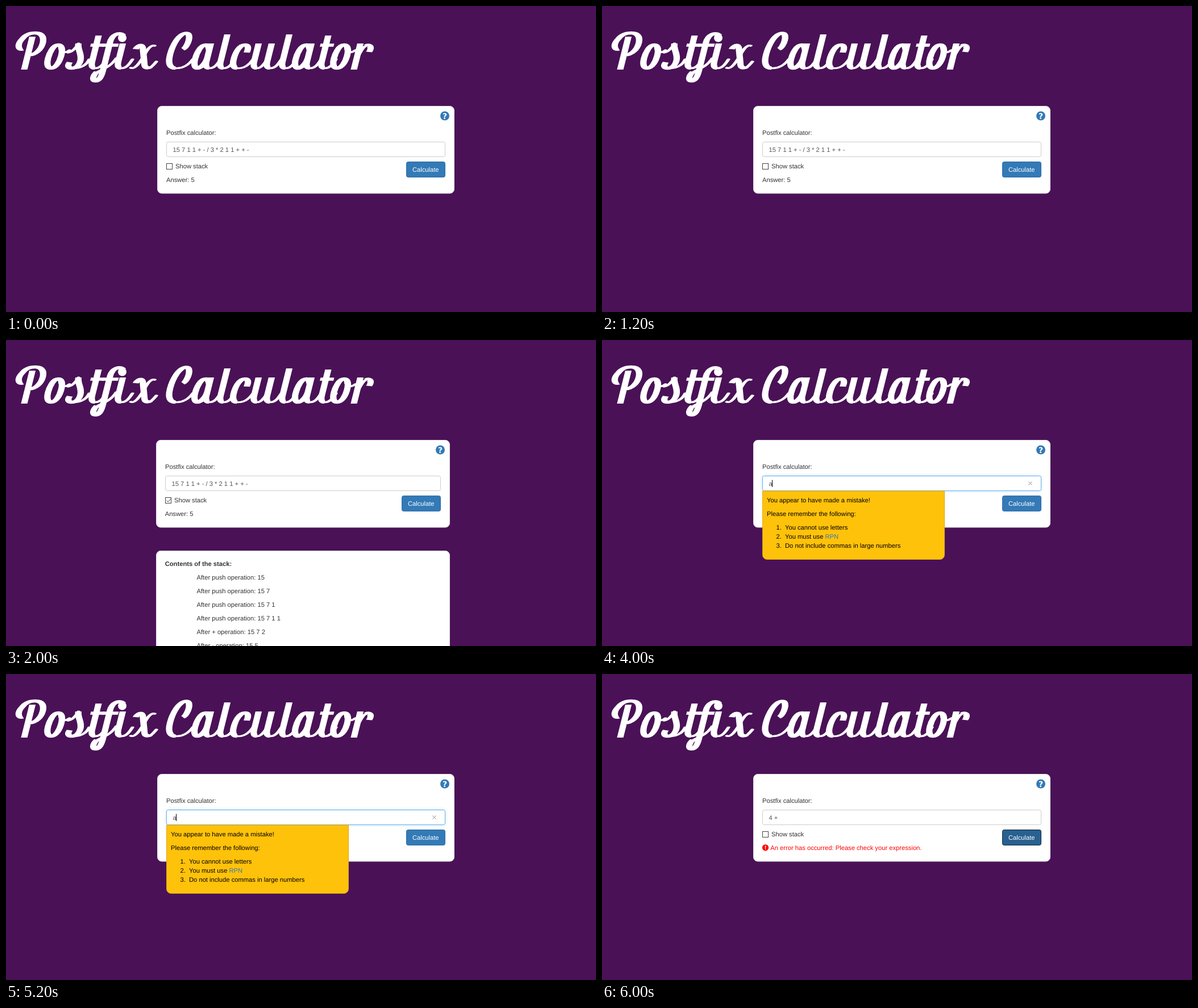
Animation, 1038 px wide and 539 px high, one loop 8 s. Source, as an HTML page:

```html
<!DOCTYPE html>
<html lang="en">
<head>
<meta charset="utf-8">
<title>Postfix Calculator</title>
<style>
html, body { margin: 0; width: 100%; height: 100%; overflow: hidden; background: #4a1157; }
svg { display: block; }
text { font: 11.2px "Liberation Sans", Arial, sans-serif; fill: #333; text-rendering: geometricPrecision; white-space: pre; }
.bold { font-weight: bold; }
.field { fill: #555; }
.white { fill: #fff; }
.error { fill: #f00; }
.black { fill: #000; }
.link { fill: #337ab7; }
.mid { text-anchor: middle; }
.mark { font: bold 14px "DejaVu Sans", sans-serif; }
.small { font-size: 9px; }
#title { fill: none; stroke: #fff; }
</style>
</head>
<body>
<svg width="1038" height="539" viewBox="0 0 1038 539">
  <defs><filter id="glow" x="-5%" y="-60%" width="110%" height="220%"><feGaussianBlur stdDeviation="2"/></filter></defs>
  <g id="title" role="img" aria-label="Postfix Calculator"></g>
  <g id="scenes"></g>
</svg>
<script>
const STEP = 2000;

// Script lettering: upright skeletons, slanted and drawn with a flat pen.
// Each glyph holds its heavy strokes and its light strokes.
const foot = x => `V-14C${x} -6 ${x + 1.5} -2.7 ${x + 4} -2.7`;
const exit = x => `M${x + 3} -2.5C${x + 8} -1 ${x + 10} -8 ${x + 12} -18`;
const stem = (x, top) => `M${x} ${top}${foot(x)}`;
const glyphs = {
  P: ['M7.5 0V-58M2 -36C-3 -34 -4 -46 -1 -54C1 -62 5 -64.5 9 -64.5C16 -64.5 18 -55 18 -47C18 -35 14 -26 9 -26', ''],
  o: ['M8.5 -43.5C5 -43.5 3 -30 3 -20C3 -8 5 -2.5 8 -2.5C12 -2.5 14 -14 14 -25C14 -37 12 -43.5 8.5 -43.5Z', 'M11 -40C12 -30 17 -28 20 -34'],
  s: ['M7 -46C7 -36 12.5 -28 12.5 -16C12.5 -7 10 -2.5 6.5 -2.5C3 -2.5 2 -8 3.5 -13', 'M0 -30C3 -31 6 -38 7 -46M8 -2.5C15 -2 19 -9 20 -18'],
  t: [stem(0, -60) + 'M-5 -43H7', exit(0)],
  f: ['M10 -60C6 -67 0 -62 0 -48V2C0 14 -1.5 20 -4 20C-7.5 20 -8 10 -5 4M-6 -43H8', 'M-5 5C-2 0 6 -4 9 -20'],
  i: [stem(0, -46), exit(0)],
  x: ['M0 -36C2 -45 5 -45 6.5 -36L11 -10C12 -2 15 -2 17 -5', 'M0 -3C4 -1 6 -10 8.5 -22C10 -34 12 -44 16 -42M15 -3C17 -2 19 -7 21 -14'],
  C: ['M13 -36C17 -39 18 -64 12.5 -64C6 -64 3 -42 3 -26C3 -10 6 -2.5 11 -2.5', 'M10 -2.5C17 -1 22 -9 24 -18'],
  a: [stem(13.5, -46) + 'M13.5 -34C12 -41 11 -43.5 9 -43.5C5 -43.5 3 -30 3 -18C3 -8 5 -2.5 7 -2.5C10 -2.5 13.5 -12 13.5 -22', exit(13.5)],
  l: [stem(0, -62), exit(0)],
  c: ['M13 -30C14 -40 12 -43.5 9.5 -43.5C5 -43.5 3 -30 3 -18C3 -8 5 -2.5 8 -2.5', 'M7 -2.5C14 -1 18 -9 20 -18'],
  u: [stem(0, -46) + stem(11.5, -46), 'M3 -2.5C7 -1 10 -10 11.5 -22' + exit(11.5)],
  r: ['M0 -46V0M5.5 -42C8 -45 11.5 -40 9.5 -31', 'M0 -18C2 -32 3 -41 6 -42']
};
const letters = [...'PostfixCalculator'];
const starts = [17, 63, 102, 148, 171, 194, 219, 276, 322, 374, 390, 433, 483, 499, 552, 566, 612];

document.getElementById('title').innerHTML = letters.map((ch, i) => {
  const [heavy, light] = glyphs[ch];
  return `<g transform="matrix(2 0 -.25 1 ${starts[i]} 112)">
    <path d="${heavy}" stroke-width="5.6"/><path d="${light}" stroke-width="3.2" stroke-linecap="round"/></g>`;
}).join('') + '<circle cx="204.5" cy="56" r="7.5" fill="#fff" stroke="none"/>';

const text = (x, y, str, cls = '') => `<text x="${x}" y="${y}" class="${cls}">${str}</text>`;
const rect = (x, y, w, h, r, fill, stroke = 'none') =>
  `<rect x="${x}" y="${y}" width="${w}" height="${h}" rx="${r}" fill="${fill}" stroke="${stroke}"/>`;
const disc = (x, y, r, fill) => `<circle cx="${x}" cy="${y}" r="${r}" fill="${fill}"/>`;
const panel = (left, right, y, h) => rect(left - 15.5, y, right - left + 32, h, 7.5, '#fff', '#e3e3e3');

// left and right are the edges of the panel's content
function form({ left = 282, right = 772, value, checked, answer = '', focus, hover }) {
  const width = right - left;
  const box = left + 0.5;
  return panel(left, right, 176.5, 153.5) +
    disc(right, 193.5, 8, '#337ab7') + text(right, 198.6, '?', 'white mid mark') +
    text(left, 227, 'Postfix calculator:') +
    (focus ? `<g filter="url(#glow)">${rect(box, 239.5, width, 26, 3, 'none', '#66afe9')}</g>` : '') +
    rect(box, 239.5, width, 26, 3, '#fff', focus ? '#66afe9' : '#ccc') +
    text(left + 11.5, 257, value, 'field') +
    rect(box, 277.5, 10, 10, 0, '#fff', '#444') +
    (checked ? `<path d="M${left + 2.5} 282.5l2.5 2.7 5 -5.5" fill="none" stroke="#444"/>` : '') +
    text(left + 16, 286, 'Show stack') + answer +
    rect(right - 67.5, 274.5, 68, 27, 3, hover ? '#286090' : '#337ab7', hover ? '#122b40' : '#2e6da4') +
    text(right - 33.8, 291.5, 'Calculate', 'white mid');
}

const sum = '15 7 1 1 + - / 3 * 2 1 1 + + -';
const log = ['push operation: 15', 'push operation: 15 7', 'push operation: 15 7 1',
  'push operation: 15 7 1 1', '+ operation: 15 7 2', '- operation: 15 5'];

const narrow = { left: 280, right: 764 };
const stack = panel(narrow.left, narrow.right, 371.5, 190) +
  text(279.7, 398, 'Contents of the stack:', 'bold') +
  log.map((row, i) => text(335.5, 422 + 24 * i, 'After ' + row)).join('');

const rules = ['You cannot use letters', 'You must use <tspan class="link">RPN</tspan>',
  'Do not include commas in large numbers'];
const warning = '<path d="M282.5 266H602.5V378.5a8 8 0 0 1-8 8H290.5a8 8 0 0 1-8-8Z" fill="#ffc20a" stroke="#d9a81c"/>' +
  text(290, 286, 'You appear to have made a mistake!', 'black') +
  text(290, 310, 'Please remember the following:', 'black') +
  rules.map((rule, i) => text(306.5, 334 + 16 * i, i + 1 + '.', 'black') + text(322, 334 + 16 * i, rule, 'black')).join('');
const typing = '<path d="M299.5 246.5V259" stroke="#000"/>' +
  '<path d="M750.5 249.5l6 6m0 -6l-6 6" stroke="#888" fill="none"/>';

const failure = disc(287.5, 305.8, 5.6, '#f00') + text(287.5, 309.2, '!', 'white mid mark small') +
  text(296.3, 310, 'An error has occurred: Please check your expression.', 'error');

const scenes = [
  form({ value: sum, answer: text(282, 310, 'Answer: 5') }),
  form({ ...narrow, value: sum, checked: true, answer: text(279.7, 310, 'Answer: 5') }) + stack,
  form({ value: 'a', focus: true }) + typing + warning,
  form({ value: '4 +', answer: failure, hover: true })
];
const holder = document.getElementById('scenes');
holder.innerHTML = scenes.map(scene => `<g>${scene}</g>`).join('');

const begin = performance.now();
function draw() {
  const current = Math.floor((performance.now() - begin) / STEP) % scenes.length;
  [...holder.children].forEach((g, i) => g.style.display = i === current ? '' : 'none');
  requestAnimationFrame(draw);
}
draw();
</script>
</body>
</html>
```
